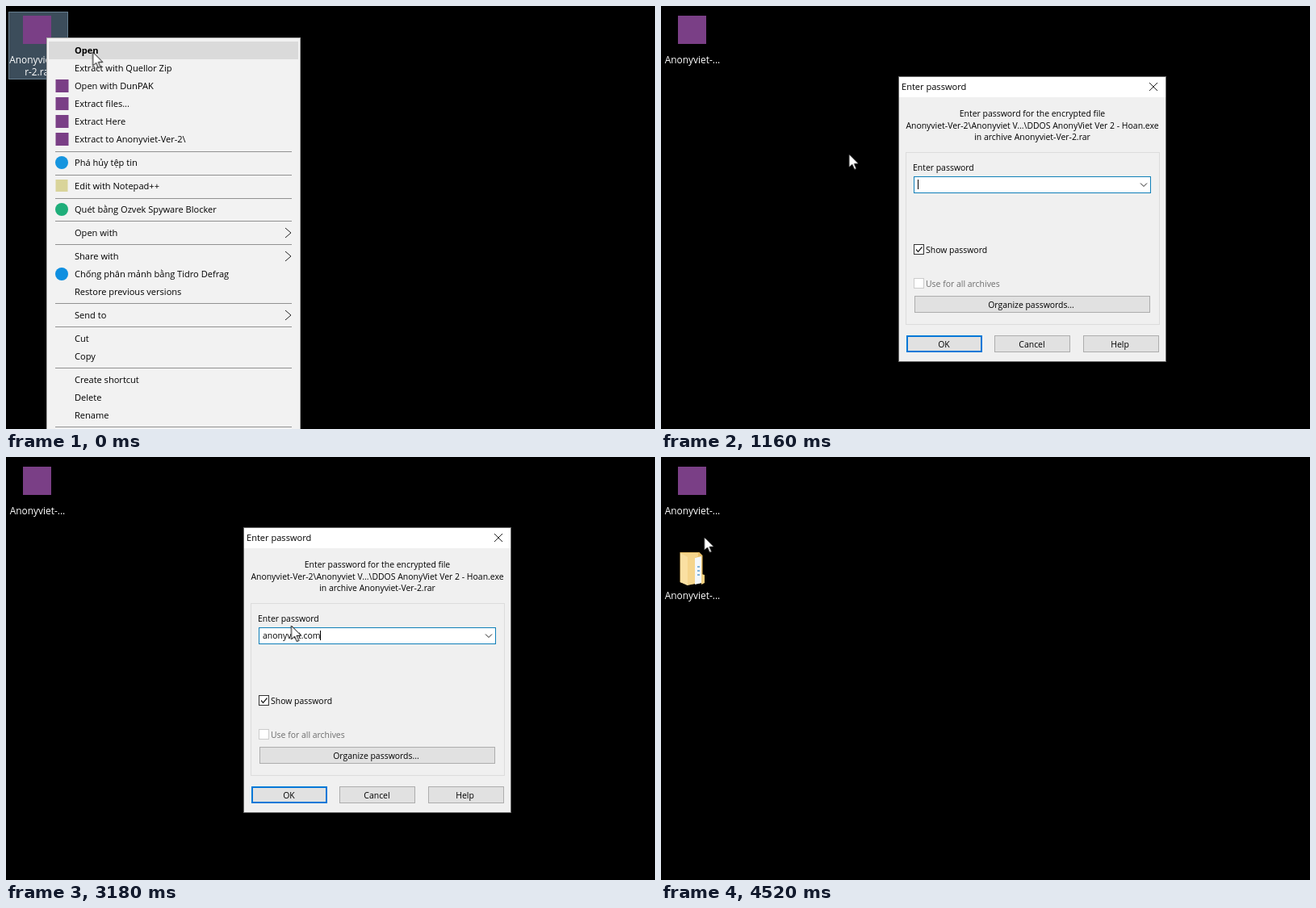
Animation, 804 px wide and 524 px high, one loop 4540 ms. Source, as an HTML page:

```html
<!DOCTYPE html>
<html lang="vi">
<head>
<meta charset="utf-8">
<title>Extract an archive</title>
<style>
html, body { margin: 0; width: 100%; height: 100%; overflow: hidden; background: #000; }
svg { display: block; width: 804px; height: 524px; }
text, .typed { font: 10.45px "Open Sans", sans-serif; white-space: pre; }
.ui text, text.ui { font-size: 11.07px; }
.label text, text.label { font-size: 11.9px; fill: #fff; text-anchor: middle; }
.bold { font-weight: 700; }
.mid { text-anchor: middle; }
.end { text-anchor: end; }
.btn rect { fill: #e1e1e1; stroke: #adadad; }
.box { fill: none; stroke: #dcdcdc; }
.bar { fill: #e6e6e6; stroke: #bcbcbc; }
.line { fill: none; stroke: #222; }
.focus { fill: #e1e1e1; stroke: #0078d7; stroke-width: 2; }
.anim, .key { animation: 4540ms linear infinite; }
.step { animation-timing-function: step-end; }
.arrow { animation-name: move; }
.menu { animation-name: menu; }
.row { animation-name: row; }
.picked { animation-name: picked; }
.plain { animation-name: plain; }
.hover { animation-name: hover; }
.folder { animation-name: folder; }
.pass { animation-name: pass; transform-origin: 460px 264px; }
.early { animation-name: early; }
.late { animation-name: late; }
.ok { animation-name: ok; }
.typed { line-height: 17px; color: #000; }
.key { font-style: normal; font-size: 0; animation-name: key; animation-timing-function: step-end; animation-delay: calc(var(--t) * 1ms); }
.caret { display: inline-block; width: 1px; height: 12px; background: #000; vertical-align: -2px; }

@keyframes move {
  0% { transform: translate(107.5px, 57px); }
  10.57% { transform: translate(141px, 156px); animation-timing-function: ease-out; }
  13.66%, 18.94% { transform: translate(141.5px, 143px); }
  22.47% { transform: translate(199.5px, 165px); }
  24.23% { transform: translate(222px, 177px); animation-timing-function: ease-out; }
  35.24%, 59.91% { transform: translate(277.5px, 209px); animation-timing-function: ease-in-out; }
  68.72%, 71.8% { transform: translate(353.5px, 209px); animation-timing-function: ease-in-out; }
  76.65%, 78.4% { transform: translate(350px, 413px); }
  80.6% { transform: translate(390px, 462px); animation-timing-function: ease-out; }
  83.26% { transform: translate(336px, 438px); }
  87.67% { transform: translate(333.5px, 439.5px); animation-timing-function: ease-in-out; }
  95.15% { transform: translate(60px, 84px); }
  97.4% { transform: translate(52px, 60px); }
  99.5%, 100% { transform: translate(53.5px, 99px); }
}
@keyframes menu { 0%, 19.4% { opacity: 1; } 21.1%, 100% { opacity: 0; } }
@keyframes row {
  0% { transform: translateY(0); }
  .97% { transform: translateY(22px); }
  3.3% { transform: translateY(44px); }
  5.66% { transform: translateY(66px); }
  8% { transform: translateY(88px); }
  10.35% { transform: translateY(110px); }
  11.06%, 100% { transform: translateY(88px); }
}
@keyframes picked { 0% { opacity: 1; } 20%, 100% { opacity: 0; } }
@keyframes plain { 0% { opacity: 0; } 20%, 100% { opacity: 1; } }
@keyframes hover { 0% { opacity: 0; } 95.55% { opacity: 1; } 99%, 100% { opacity: 0; } }
@keyframes folder { 0% { opacity: 0; } 96.9%, 100% { opacity: 1; } }
@keyframes pass {
  0%, 21.4% { opacity: 0; transform: scale(.965); }
  22.47% { opacity: .6; transform: scale(.982); }
  24.7%, 83.5% { opacity: 1; transform: none; }
  85.9%, 100% { opacity: 0; transform: scale(.965); }
}
@keyframes early { 0%, 20.3% { opacity: 0; } 21.6% { opacity: .85; } 22.47% { opacity: .57; } 24%, 100% { opacity: 0; } }
@keyframes late { 0%, 83.4% { opacity: 0; } 84.6%, 86.4% { opacity: 1; } 87.67% { opacity: .61; } 89.3%, 100% { opacity: 0; } }
@keyframes ok { 0% { fill: #e1e1e1; } 76.4% { fill: #e5f1fb; } 78.8%, 100% { fill: #e1e1e1; } }
@keyframes key { 0% { font-size: 10.45px; } 52%, 100% { font-size: 0; } }
</style>
</head>
<body>
<svg viewBox="0 0 804 524">
  <defs>
    <g id="extract">
      <rect x="309.5" y="131.5" width="299" height="263" fill="#f0f0f0" stroke="#999"/>
      <rect x="310" y="132" width="298" height="25" fill="#fff"/>
      <rect x="313" y="136" width="16" height="16" fill="#7a3f86"/>
      <rect x="535.5" y="139.5" width="9" height="9" fill="none" stroke="#ccc"/>
      <path class="line" d="M491 144.5h10M580.5 139l10 10m0-10l-10 10"/>
      <rect class="box" x="319.5" y="167.5" width="279" height="66"/>
      <rect class="box" x="319.5" y="244.5" width="279" height="88"/>
      <text x="324" y="182">C:\Users\baokl\Desktop\Anonyviet-Ver-2.rar</text>
      <text x="324" y="195">extracting</text>
      <text x="592" y="209" class="end">0%</text>
      <rect class="bar" x="324.5" y="214.5" width="269" height="12"/>
      <text x="324" y="259">Elapsed time</text>
      <path d="M321 278.5h276" stroke="#a0a0a0"/>
      <text x="324" y="308">Processed</text>
      <rect class="bar" x="324.5" y="313.5" width="269" height="12"/>
      <g class="btn">
        <rect x="320.5" y="341.5" width="136" height="20"/>
        <rect x="461.5" y="341.5" width="136" height="20"/>
        <rect x="320.5" y="367.5" width="136" height="20"/>
        <rect x="461.5" y="367.5" width="65" height="20"/>
        <rect x="532.5" y="367.5" width="65" height="20"/>
      </g>
      <g class="mid">
        <text x="529" y="356">Pause</text>
        <text x="387" y="382">Cancel</text>
        <text x="493" y="382">Mode...</text>
        <text x="564.5" y="382">Help</text>
      </g>
    </g>
  </defs>

  <!-- desktop -->
  <rect class="anim step hover" x="3.5" y="7.5" width="73" height="83" fill="#1d2b36" stroke="#33444f"/>
  <rect class="anim step picked" x="3.5" y="7.5" width="73" height="83" fill="#3c4d5b" stroke="#667d8e"/>
  <rect x="21" y="12" width="35" height="35" fill="#7a3f86"/>
  <g class="anim step picked label">
    <text x="40.5" y="71">Anonyviet-Ve</text>
    <text x="40.5" y="86">r-2.rar</text>
  </g>
  <text class="anim step plain label" x="39" y="71">Anonyviet-...</text>
  <g class="anim step folder">
    <path d="M23.5 118h24l4 4v34l-18 2-10-3z" fill="#e9bf69"/>
    <path d="M42 125l8-2v33l-8 2z" fill="#f4f8fb"/>
    <path d="M45 136h3m-3 5h3m-3 5h3" stroke="#7db3dc" stroke-width="2"/>
    <path d="M24 119h22v4l-4 2v32l-9 2-9-4z" fill="#f5d58c"/>
    <path d="M24 119l9 5v35l-9-4z" fill="#fae0a2"/>
    <path d="M50 145l4 1v10l-4 2z" fill="#f3d080"/>
    <text class="label" x="39" y="176">Anonyviet-...</text>
  </g>

  <!-- context menu -->
  <g class="anim menu ui">
    <rect x="50.5" y="39.5" width="314" height="500" fill="#f2f2f2" stroke="#a8a8a8"/>
    <rect class="anim step row" x="53" y="44" width="309" height="22" fill="#dadada"/>
    <path d="M61 180.5h293m-293 29h293m-293 29h293m-293 28h293m-293 29h293m-293 73h293m-293 29h293m-293 51h293m-293 73h293" stroke="#919191"/>
    <path class="line" d="M346 275l7 6-7 6m0 17l7 6-7 6m0 61l7 6-7 6"/>
    <path d="M61.5 91h16v16h-16zm0 22h16v16h-16zm0 22h16v16h-16zm0 22h16v16h-16z" fill="#7a3f86"/>
    <circle cx="69" cy="194" r="8" fill="#1695df"/>
    <rect x="61.5" y="215" width="15" height="15" fill="#d9d49a"/>
    <circle cx="69" cy="252" r="8" fill="#1fae7a"/>
    <circle cx="69" cy="332" r="8" fill="#0f8fe0"/>
    <text x="85" y="59" class="bold">Open</text>
    <text x="85" y="81">Extract with Quellor Zip</text>
    <text x="85" y="103">Open with DunPAK</text>
    <text x="85" y="125">Extract files...</text>
    <text x="85" y="147">Extract Here</text>
    <text x="85" y="169">Extract to Anonyviet-Ver-2\</text>
    <text x="85" y="198">Phá hủy tệp tin</text>
    <text x="85" y="227">Edit with Notepad++</text>
    <text x="85" y="256">Quét bằng Ozvek Spyware Blocker</text>
    <text x="85" y="285">Open with</text>
    <text x="85" y="314">Share with</text>
    <text x="85" y="336">Chống phân mảnh bằng Tidro Defrag</text>
    <text x="85" y="358">Restore previous versions</text>
    <text x="85" y="387">Send to</text>
    <text x="85" y="416">Cut</text>
    <text x="85" y="438">Copy</text>
    <text x="85" y="467">Create shortcut</text>
    <text x="85" y="489">Delete</text>
    <text x="85" y="511">Rename</text>
  </g>

  <!-- progress, after the password -->
  <g class="anim late">
    <use href="#extract"/>
    <text class="ui" x="334" y="148">Extracting from Anonyvi...</text>
    <text x="324" y="209">Anonyviet-Ver-2</text>
    <text x="592" y="259" class="end">00:00:00</text>
    <text x="592" y="308" class="end">1%</text>
    <rect class="focus" x="321" y="342" width="135" height="19"/>
    <text x="387" y="356" class="mid">Background</text>
  </g>

  <!-- password dialog -->
  <g class="anim pass">
    <rect x="294.5" y="87.5" width="331" height="353" fill="#f0f0f0" stroke="#666"/>
    <rect x="295" y="88" width="330" height="25" fill="#fff"/>
    <text class="ui" x="298" y="104">Enter password</text>
    <path class="line" d="M605 95l10 10m0-10l-10 10"/>
    <g class="mid">
      <text x="460" y="137">Enter password for the encrypted file</text>
      <text x="460" y="152">Anonyviet-Ver-2\Anonyviet V...\DDOS AnonyViet Ver 2 - Hoan.exe</text>
      <text x="460" y="166">in archive Anonyviet-Ver-2.rar</text>
    </g>
    <rect class="box" x="303.5" y="181.5" width="314" height="213"/>
    <text x="312" y="204">Enter password</text>
    <rect x="313.5" y="211.5" width="293" height="20" fill="#fff" stroke="#0f7fb8"/>
    <path class="line" d="M594 219.5l4 4 4-4"/>
    <foreignObject x="318" y="212.5" width="270" height="18">
      <div class="typed"><i class="key" style="--t:1640">a</i><i class="key" style="--t:1690">n</i><i class="key" style="--t:1740">o</i><i class="key" style="--t:1790">n</i><i class="key" style="--t:1840">y</i><i class="key" style="--t:1890">v</i><i class="key" style="--t:1940">i</i><i class="key" style="--t:2200">e</i><i class="key" style="--t:2290">t</i><i class="key" style="--t:2400">.</i><i class="key" style="--t:2480">c</i><i class="key" style="--t:2560">o</i><i class="key" style="--t:2680">m</i><b class="caret"></b></div>
    </foreignObject>
    <rect x="313.5" y="295.5" width="12" height="12" fill="#fff" stroke="#333"/>
    <path class="line" d="M316 301.5l2.5 3 5-6" stroke-width="1.2"/>
    <text x="328" y="306">Show password</text>
    <rect x="313.5" y="337.5" width="12" height="12" fill="#fff" stroke="#ccc"/>
    <text x="328" y="348" fill="#6d6d6d">Use for all archives</text>
    <g class="btn">
      <rect x="314.5" y="359.5" width="291" height="20"/>
      <rect x="413.5" y="408.5" width="93" height="20"/>
      <rect x="523.5" y="408.5" width="93" height="20"/>
    </g>
    <rect class="focus anim step ok" x="305" y="409" width="92" height="19"/>
    <g class="mid">
      <text x="458.5" y="374">Organize passwords...</text>
      <text x="350.5" y="423">OK</text>
      <text x="459.5" y="423">Cancel</text>
      <text x="568.5" y="423">Help</text>
    </g>
  </g>

  <!-- progress, before the password -->
  <g class="anim early">
    <use href="#extract"/>
    <text class="ui" x="334" y="148" fill="#999">Extracting from Anonyvi...</text>
    <text x="324" y="209">DDOS AnonyViet Ver 2 - Hoan.exe</text>
    <text x="324" y="272">Time left</text>
    <text x="592" y="308" class="end">0%</text>
    <text x="387" y="356" class="mid">Background</text>
  </g>

  <path class="anim arrow" d="M0 0v17l4-3.8 2.8 6.3 2.6-1.1-2.7-6.1h5.5z" fill="#fff" stroke="#000"/>
</svg>
</body>
</html>
```
